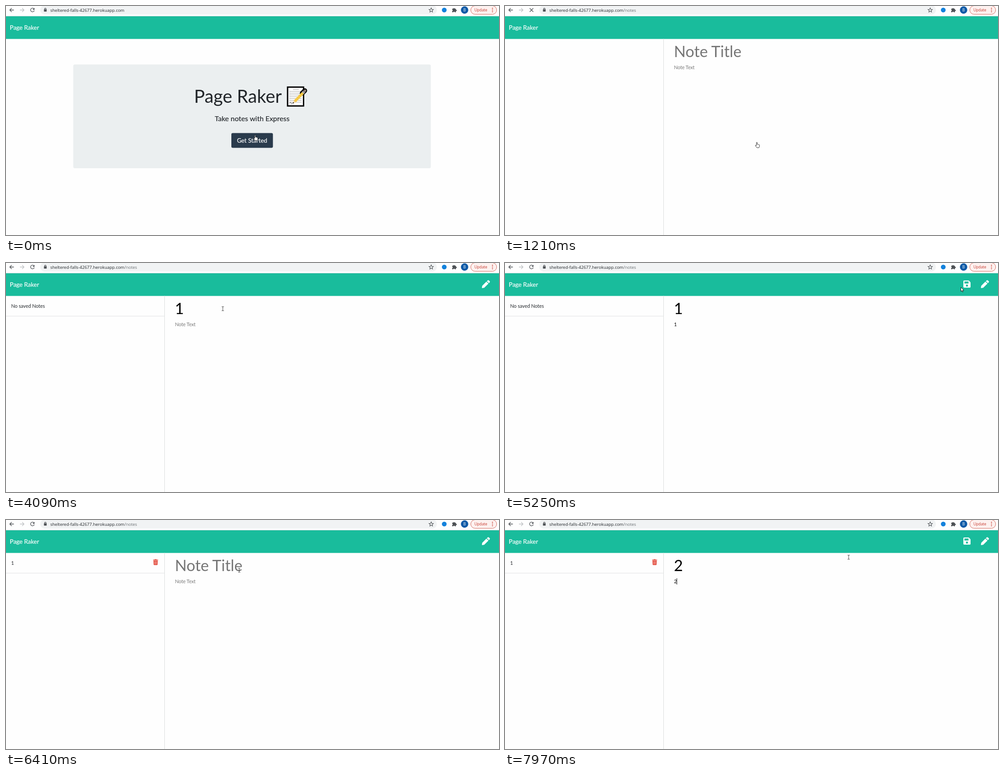
Recreate the animation shown at these times as an HTML page. Size 1096 px wide and 511 px high, loop 8 s.

```html
<!DOCTYPE html>
<html lang="en">
<head>
<meta charset="utf-8">
<title>Page Raker</title>
<style>
  html, body { margin: 0; width: 100%; height: 100%; overflow: hidden; background: #fefefe; }
  svg { display: block; width: 1096px; height: 511px; }
  text { font-family: Lato, sans-serif; font-size: 10.74px; fill: #212529; white-space: pre; }
  .ui { font-family: "Open Sans", "Noto Sans", sans-serif; font-size: 9.47px; }
  .title { font-size: 34.4px; }
  .lead { font-size: 15.88px; stroke: #212529; stroke-width: .15; }
  .brand { font-size: 13.35px; fill: #fff; stroke: #fff; stroke-width: .2; }
  .line { fill: none; stroke: #4d5155; stroke-width: 1.3; }
</style>
</head>
<body>
<svg viewBox="0 0 1096 511" xmlns="http://www.w3.org/2000/svg">
  <rect width="1096" height="511" fill="#fefefe"/>

  <!-- browser bar -->
  <g>
    <rect x="76" y="-1" width="882" height="20" rx="10" fill="#f1f3f4"/>
    <rect y="22" width="1096" height="1" fill="#d9dfe0"/>
    <path class="line" d="M17.5 9H8.5M12.6 4.8L8.4 9L12.6 13.2"/>
    <path class="line" style="stroke:#bfc2c5" d="M31 9H40M35.9 4.8L40.1 9L35.9 13.2"/>
    <g id="reload">
      <path class="line" d="M62.2 6.2A4.2 4.2 0 1 0 62.9 10.2"/>
      <path d="M63.4 4V8.4H59Z" fill="#4d5155"/>
    </g>
    <path id="stop" class="line" d="M54.9 5L62.9 13M62.9 5L54.9 13"/>
    <rect x="84.4" y="7.6" width="6" height="5" rx=".7" fill="#4d5155"/>
    <path class="line" d="M85.7 8V6.6a1.7 1.7 0 0 1 3.4 0V8"/>
    <text class="ui" x="98.5" y="12.5">sheltered-falls-42677.herokuapp.com<tspan id="path" fill="#6b7074">/notes</tspan></text>
    <path id="star" class="line" style="stroke-width:1.1"/>
    <circle cx="974.3" cy="9" r="5.3" fill="#1482dc"/>
    <path fill="#4d5155" d="M992 6H994.4A1.6 1.6 0 1 1 997.6 6H1000V8.4A1.6 1.6 0 1 1 1000 11.4V14H997.6A1.5 1.5 0 0 0 994.6 14H992V11.2A1.5 1.5 0 0 0 992 8.3Z"/>
    <circle cx="1019.5" cy="9" r="8.2" fill="#0d5aa7"/>
    <text class="ui" x="1019.5" y="12" text-anchor="middle" style="font-size:8.5px;fill:#fff">B</text>
    <rect x="1033.2" y="-.5" width="57.6" height="19" rx="9.5" fill="#fdf1ef" stroke="#d5695f"/>
    <text class="ui" x="1041.5" y="12" style="font-size:8.3px;fill:#c5372c">Update</text>
    <g fill="#c5372c"><circle cx="1081.5" cy="5.2" r="1.1"/><circle cx="1081.5" cy="9" r="1.1"/><circle cx="1081.5" cy="12.8" r="1.1"/></g>
  </g>

  <rect y="23" width="1096" height="50.5" fill="#19bc9c"/>
  <text class="brand" x="8.6" y="52.5">Page Raker</text>

  <!-- landing page -->
  <g id="home">
    <rect x="149.5" y="130.5" width="795" height="231.5" rx="3.5" fill="#ebeff0"/>
    <text x="418" y="216" style="font-size:40.1px">Page Raker</text>
    <path d="M626 181H661.5V223H626Z" fill="#fff" stroke="#000" stroke-width="3"/>
    <path id="rules" stroke="#a9a9a9" stroke-width="1.2"/>
    <path d="M630 217q3-4 4 0t4-1" fill="none" stroke="#555"/>
    <path d="M658.5 194.5L664.2 188.8" stroke="#000" stroke-width="10.5" stroke-linecap="round"/>
    <path d="M637.8 217.2L639.8 209.8L645.2 215Z" fill="#efd3a3"/>
    <path d="M642.2 212.6L660 194" stroke="#f6c945" stroke-width="6"/>
    <path d="M660 194L663 190.9" stroke="#c5c5c5" stroke-width="6"/>
    <path d="M663 190.9L665 188.8" stroke="#8f8178" stroke-width="5" stroke-linecap="round"/>
    <path d="M637.6 217.4L638.4 214.6L640.4 216.6Z"/>
    <text class="lead" x="547.2" y="257" text-anchor="middle">Take notes with Express</text>
    <rect id="ring" x="499.8" y="282.4" width="94.8" height="35.2" rx="4.2" fill="none" stroke="#8b969e" stroke-width="2.4"/>
    <rect id="button" x="501" y="283.6" width="92.4" height="32.8" rx="3.2"/>
    <text class="brand" x="547.1" y="304.7" text-anchor="middle">Get Started</text>
  </g>

  <!-- notes page -->
  <g id="notes">
    <rect x="352" y="73" width="1" height="438" fill="#dadcdd"/>
    <text id="title" class="title" x="375.5" y="113.8"></text>
    <text id="body" x="375.7" y="140.8"></text>
    <rect id="caret" width="1"/>
    <g id="list">
      <rect y="118" width="352" height="1" fill="#e0e1e2"/>
      <text id="entry" x="11.6" y="99.6"></text>
      <g transform="translate(1058 38)" fill="#fff">
        <path d="M10 3.5L14.5 8L5.2 17.2L.8 18Q-.1 18.1 0 17.2L.8 12.7Z"/>
        <path d="M11 2.5L13 .7Q14.2-.4 15.4 .7L17.4 2.7Q18.5 3.9 17.4 5L15.5 7Z"/>
      </g>
    </g>
    <path id="save" transform="translate(1019 39)" fill="#fff" fill-rule="evenodd"
      d="M1.7 0H11.3Q12 0 12.6 .6L15.4 3.4Q16 4 16 4.7V14.3Q16 16 14.3 16H1.7Q0 16 0 14.3V1.7Q0 0 1.7 0ZM2.4 2.3V6.8H11.4V2.3ZM8 9.1A2.3 2.3 0 1 0 8 13.7A2.3 2.3 0 1 0 8 9.1Z"/>
    <g id="trash" transform="translate(327 87.5)" fill="#e2483a">
      <path d="M0 1H3L3.6 0H7.6L8.2 1H11.2V2.2H0Z"/>
      <path d="M.8 3H10.4L9.9 11.8Q9.8 13 8.6 13H2.6Q1.4 13 1.3 11.8Z"/>
      <path d="M3.4 4.8V11.2M5.6 4.8V11.2M7.8 4.8V11.2" stroke="#f9d6d2" stroke-width=".8"/>
    </g>
  </g>

  <!-- pointers, each drawn around its hot spot -->
  <g id="hand"><path transform="translate(-4 -.5)" fill="#fff" stroke="#222" stroke-width=".9" stroke-linejoin="round"
    d="M3 8V1.6Q3 .6 3.9 .6T4.8 1.6V5Q6.4 4.7 6.6 5.5Q8 5.1 8.2 6Q9.7 5.7 9.7 7V9Q9.5 10.7 8.6 12.7H4Q2.6 10.7 .6 8.4Q.6 6.8 1.9 7.2Z"/></g>
  <g id="beam"><path fill="none" stroke="#333" stroke-width=".9"
    d="M-2.4-4.6H-.8Q0-4.6 0-3.8Q0-4.6 .8-4.6H2.4M0-4V4M-2.4 4.6H-.8Q0 4.6 0 3.8Q0 4.6 .8 4.6H2.4"/></g>
  <g id="arrow"><path fill="#fff" stroke="#111" stroke-width=".9" d="M0 0V9.4L2.1 7.4L3.6 10.8L5 10.2L3.6 6.9H6.6Z"/></g>
</svg>
<script>
const LOOP = 8000;
const el = id => document.getElementById(id);
const show = (id, on) => { el(id).style.display = on ? '' : 'none'; };
const clamp = v => Math.max(0, Math.min(1, v));
const smooth = v => v * v * (3 - 2 * v);
const mix = (a, b, k) => a + (b - a) * k;

// pointer hot spot: time, x, y
const moves = [
  [90, 554, 288], [250, 555, 280], [490, 560, 304], [1750, 560, 304],
  [2320, 407, 108], [2530, 486, 104], [2770, 482, 102], [4500, 482, 102],
  [5170, 990, 58], [5250, 1013.5, 54], [5400, 1022, 52], [5570, 1022, 52],
  [6340, 537, 119], [6410, 518.5, 112], [6720, 450, 104], [7600, 450, 104],
  [7970, 764, 83]
];

// caret: from, to, x, in title field
const carets = [
  [2590, 3070, 376, true], [3540, 4090, 395, true], [4240, 4390, 376, false],
  [4390, 4920, 382, false], [6640, 7180, 376, true], [7350, 7500, 395, true],
  [7500, 7650, 376, false], [7650, LOOP, 381.5, false]
];

function pointerAt(t) {
  if (t <= moves[0][0]) return moves[0].slice(1);
  const i = moves.findIndex(m => m[0] > t);
  if (i < 0) return moves[moves.length - 1].slice(1);
  const [a, b] = [moves[i - 1], moves[i]];
  const k = smooth((t - a[0]) / (b[0] - a[0]));
  return [mix(a[1], b[1], k), mix(a[2], b[2], k)];
}

function pointerKind(t, x, y) {
  if (t < 1760 || (y < 73 && x > 1018)) return 'hand';
  return y < 79 ? 'arrow' : 'beam';
}

function field(id, value, hint) {
  const node = el(id), text = value || hint;
  if (node.textContent !== text) node.textContent = text;
  node.style.fill = value ? '#000' : '#757575';
}

function draw(t) {
  const within = (a, b) => t >= a && t < b;
  const loading = within(800, 1280);
  show('reload', !loading);
  show('stop', loading);
  show('path', t >= 800);

  show('home', t < 1210);
  show('notes', t >= 1210);
  const dark = clamp((t - 90) / 150);
  const rgb = [[42, 30], [59, 43], [76, 55]].map(([a, b]) => Math.round(mix(a, b, dark)));
  el('button').style.fill = `rgb(${rgb})`;
  el('ring').style.opacity = clamp((t - 640) / 150);

  const saved = t >= 5640;
  show('list', t >= 1280);
  show('trash', saved);
  show('save', within(4390, 5570) || t >= 7650);
  el('entry').textContent = saved ? '1' : 'No saved Notes';
  field('title', within(3540, 5570) ? '1' : t >= 7350 ? '2' : '', 'Note Title');
  field('body', within(4390, 5570) ? '1' : t >= 7650 ? '2' : '', 'Note Text');

  const caret = carets.find(c => within(c[0], c[1]));
  show('caret', caret);
  if (caret) {
    const big = caret[3];
    el('caret').setAttribute('x', caret[2]);
    el('caret').setAttribute('y', big ? 82 : 130);
    el('caret').setAttribute('height', big ? 37 : 14);
  }

  const [x, y] = pointerAt(t);
  const kind = pointerKind(t, x, y);
  for (const id of ['hand', 'beam', 'arrow']) show(id, id === kind);
  el(kind).setAttribute('transform', `translate(${x} ${y})`);
}

const starPoints = Array.from({ length: 10 }, (_, i) => {
  const r = i % 2 ? 2.3 : 5.2, a = (i / 5 - 0.5) * Math.PI;
  return `${945.3 + r * Math.cos(a)} ${9.3 + r * Math.sin(a)}`;
});
el('star').setAttribute('d', `M${starPoints.join('L')}Z`);
el('rules').setAttribute('d', Array.from({ length: 8 }, (_, i) =>
  `M${i ? 630 : 638} ${186.5 + i * 4}H${i ? 657 : 651}`).join(''));

const start = performance.now();
function tick(now) {
  draw(Math.max(0, now - start) % LOOP);
  requestAnimationFrame(tick);
}
draw(0);
requestAnimationFrame(tick);
</script>
</body>
</html>
```
